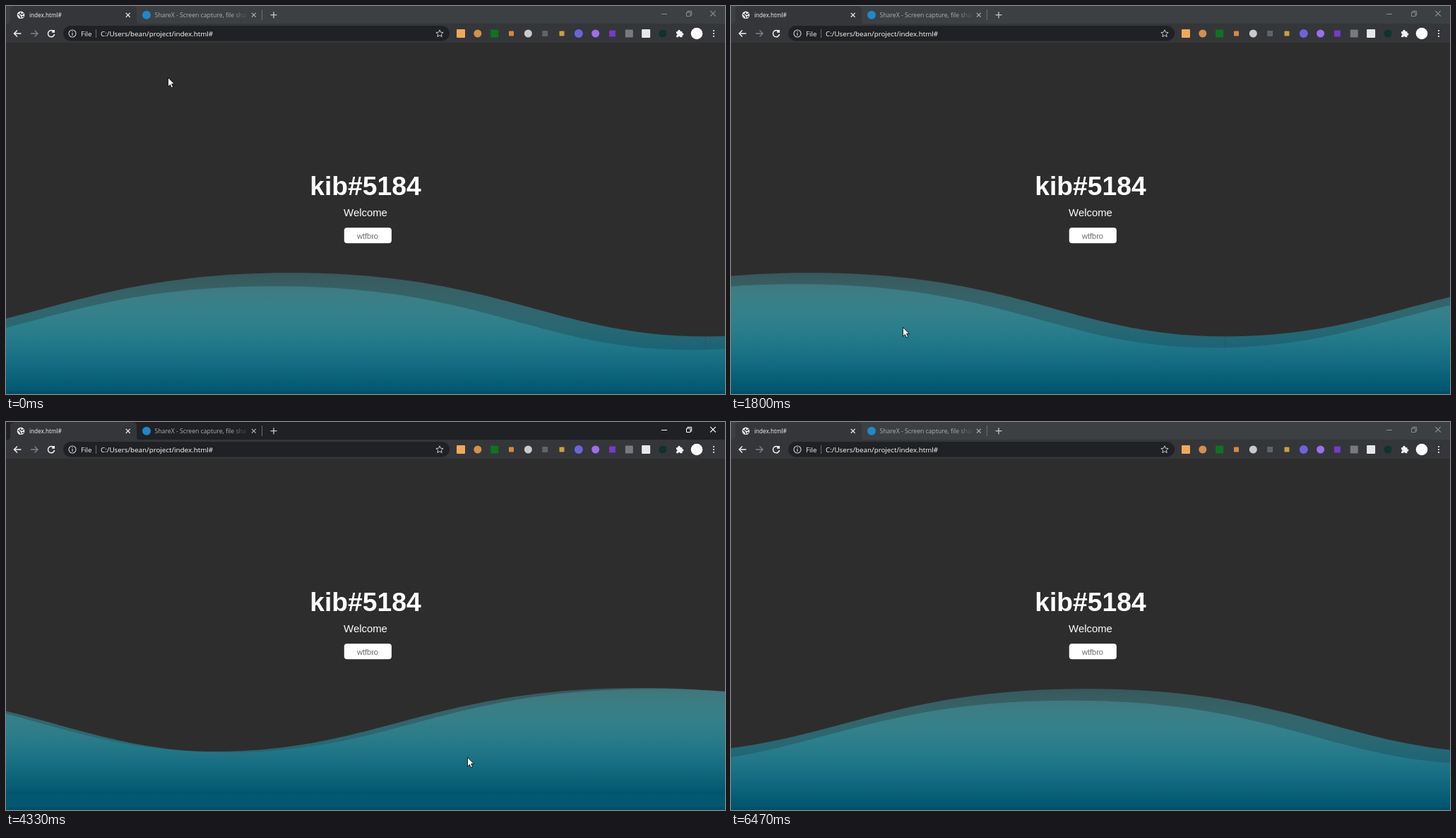
Recreate the animation shown at these times as an HTML page with a canvas. Size 1018 by 550 pixels, loop 6.54 s.

```html
<!DOCTYPE html>
<html lang="en">
<head>
<meta charset="utf-8">
<title>index.html#</title>
<style>
  html, body { margin: 0; width: 100%; height: 100%; overflow: hidden; background: #2d2d2d; }
  canvas { display: block; }
</style>
</head>
<body>
<canvas id="stage" width="1018" height="550"></canvas>
<script>
const ctx = document.getElementById('stage').getContext('2d');
const W = 1018, H = 550, TAU = Math.PI * 2;
const LOOP = 6540, FPS = 15;
const SCALE = W / 1366;          // page pixels to stage pixels
const BAR = 52;                  // height of tabs and toolbar
const OCEAN = 525.8;             // top of the solid water
const PERIOD = 7000, PHASE = 1025;
const UI = '"Open Sans", "Noto Sans", sans-serif';
const ARIAL = '"Liberation Sans", Arial, sans-serif';

// time, x, y of the pointer tip
const POINTER = [
  [0, 229, 101], [330, 238, 112], [670, 256, 175], [1000, 275, 352],
  [1330, 277, 340], [1670, 256, 420], [2000, 222, 503], [2330, 196, 522],
  [2600, 200, 479], [3000, 262, 482], [3400, 360, 449], [3870, 525, 482],
  [4330, 653, 475], [4730, 618, 528], [5200, 513, 443], [5530, 565, 485],
  [5870, 680, 555], [6540, 700, 600]
];

function bezier(x1, y1, x2, y2) {
  const at = (a, b, u) => 3 * u * (1 - u) * (1 - u) * a + 3 * u * u * (1 - u) * b + u * u * u;
  return x => {
    let lo = 0, hi = 1;
    for (let i = 0; i < 24; i++) {
      const mid = (lo + hi) / 2;
      if (at(x1, x2, mid) < x) lo = mid; else hi = mid;
    }
    return at(y1, y2, lo);
  };
}
const drift = bezier(0.36, 0.45, 0.63, 0.53);
const ease = bezier(0.25, 0.1, 0.25, 1);
const cycle = t => (t % PERIOD) / PERIOD;

function swell(t) {
  const p = cycle(t) * 2;
  return p < 1 ? -25 + 30 * ease(p) : 5 - 30 * ease(p - 1);
}

function text(str, x, y, font, color, align = 'left') {
  ctx.font = font;
  ctx.fillStyle = color;
  ctx.textAlign = align;
  ctx.fillText(str, x, y);
}

function rect(x, y, w, h, color, r = 0) {
  ctx.fillStyle = color;
  ctx.beginPath();
  ctx.roundRect(x, y, w, h, r);
  ctx.fill();
}

function disc(x, y, r, color) {
  ctx.fillStyle = color;
  ctx.beginPath();
  ctx.arc(x, y, r, 0, TAU);
  ctx.fill();
}

function line(d, color, width = 1) {
  ctx.strokeStyle = color;
  ctx.lineWidth = width;
  ctx.stroke(new Path2D(d));
}

function cross(x, y, r, color, width) {
  line(`M${x - r} ${y - r}L${x + r} ${y + r}M${x + r} ${y - r}L${x - r} ${y + r}`, color, width);
}

const CREST = new Path2D('M0 121C311 121 409.898 -.25 811 0c400 0 500 121 789 121v77H0z');
const water = ctx.createLinearGradient(0, -21.7, 0, 198);
water.addColorStop(0, 'rgba(87,187,193,.25)');
water.addColorStop(1, 'rgb(1,88,113)');

function wave(t, top) {
  ctx.save();
  ctx.translate(0, OCEAN);
  ctx.scale(SCALE, SCALE);
  ctx.translate(-1600 * drift(cycle(t)), top);
  ctx.fillStyle = water;
  for (let i = 0; i < 2; i++) {
    ctx.fill(CREST);
    ctx.translate(1600, 0);
  }
  ctx.restore();
}

function page(t) {
  rect(0, BAR, W, H - BAR, '#2d2d2d');
  text('kib#5184', 509, 268, `bold 37.26px ${ARIAL}`, '#fff', 'center');
  text('Welcome', 509, 298, `14.9px ${ARIAL}`, '#fff', 'center');
  rect(478.8, 314.2, 67.1, 22, '#fff', 4);
  text('wtfbro', 512, 329.5, `11px ${ARIAL}`, '#6b6b6b', 'center');
  rect(0, OCEAN, W, H - OCEAN, '#015871');
  const now = t + PHASE;
  wave(now, -198);
  wave(now + 125, -175 + swell(now + 1250));
  rect(0, 546, W, 4, '#015069');
}

function tabs(focused) {
  const strip = focused ? '#202124' : '#3c4043';
  const control = focused ? '#fff' : '#8b8d90';
  rect(0, 0, W, 26, strip);
  ctx.fillStyle = '#35363a';
  ctx.fill(new Path2D('M0 26Q6 26 6 20V6Q6 0 12 0H179Q185 0 185 6V20Q185 26 191 26z'));

  disc(21, 12.8, 5.3, '#f1f3f4');
  line('M17 11.5l3 2.5 1 3M21 9l-1 2 3 1 2-1.5M22.5 15.5l2.5-1', '#35363a', 1.5);
  text('index.html#', 33, 16, `8.2px ${UI}`, '#f1f3f4');
  cross(172.7, 12.8, 2.9, '#e8eaed', 1.3);

  disc(199, 12.7, 6, '#2386c8');
  const fade = ctx.createLinearGradient(318, 0, 341, 0);
  fade.addColorStop(0, '#abafb3');
  fade.addColorStop(1, 'rgba(171,175,179,.1)');
  ctx.save();
  ctx.beginPath();
  ctx.rect(205, 0, 136, 25);
  ctx.clip();
  text('ShareX - Screen capture, file sharing', 210.5, 16, `8.7px ${UI}`, fade);
  ctx.restore();
  cross(350.8, 12.8, 2.9, '#b0b3b7', 1.2);
  line('M362.5 5V20', '#6a6e72');
  line('M374.5 12.7H383.5M379 8.2V17.2', '#c4c7ca', 1.3);

  line('M928 11.5H936', control);
  line('M963.5 9H969V14.5H963.5zM965 9V7.3H970.7V13H969', control);
  cross(1001, 10.7, 3.8, control, 1.1);
}

function star(x, y, r) {
  let d = '';
  for (let i = 0; i < 10; i++) {
    const a = i * TAU / 10 - TAU / 4, q = i % 2 ? r * 0.46 : r;
    d += (i ? 'L' : 'M') + (x + q * Math.cos(a)) + ' ' + (y + q * Math.sin(a));
  }
  line(d + 'z', '#c8cacd', 1);
}

// color, half size, round?
const EXTENSIONS = [
  ['#f0a85c', 6, 0], ['#d2914a', 5.5, 1], ['#0e7420', 5.5, 0], ['#d88944', 3.5, 0],
  ['#c9cacc', 5.5, 1], ['#606469', 4, 0], ['#c9a239', 3.5, 0], ['#6d62e0', 6, 1],
  ['#9a70ee', 5.5, 1], ['#743bc8', 4.5, 0], ['#77797c', 5.5, 0], ['#e6e7e8', 6, 0],
  ['#12302f', 5.5, 1]
];

function toolbar() {
  rect(0, 25, W, BAR - 25, '#35363a');
  line('M21.5 39H11.7M16 34.5L11.5 39L16 43.5', '#f1f3f4', 1.5);
  line('M35 39H44.8M40.5 34.5L45 39L40.5 43.5', '#7f8184', 1.4);
  line('M67.6 36.2A4.6 4.6 0 1 0 68.6 40', '#f1f3f4', 1.5);
  rect(65.2, 34, 3.8, 3.8, '#f1f3f4');

  rect(81, 28, 547, 21.5, '#202124', 10.75);
  line('M99 39A5 5 0 1 1 89 39A5 5 0 1 1 99 39M94 38V42M94 35.7V37', '#d4d6d9', 1.1);
  text('File', 106, 42.5, `9.8px ${UI}`, '#f1f3f4');
  line('M127.5 33V45', '#6a6d71');
  text('C:/Users/bean/project/index.html#', 134, 42.5, `9.82px ${UI}`, '#fff');
  star(614, 39.2, 5.4);

  EXTENSIONS.forEach(([color, r, round], i) => {
    const x = 644 + i * 23.83;
    if (round) disc(x, 39, r, color);
    else rect(x - r, 39 - r, r * 2, r * 2, color, 1);
  });
  rect(949, 36, 8.5, 8.3, '#f1f3f4', 1);
  disc(953, 35.6, 1.8, '#f1f3f4');
  disc(957.6, 40, 1.8, '#f1f3f4');
  disc(949, 40.4, 1.4, '#35363a');
  disc(953.2, 44.4, 1.4, '#35363a');
  disc(978, 39, 8.3, '#fff');
  for (let i = -1; i < 2; i++) disc(1002, 39 + i * 4, 1.1, '#f1f3f4');
}

function spline(a, b, c, d, u) {
  const m1 = (c[0] - b[0]) / (c[0] - a[0] || 1), m2 = (c[0] - b[0]) / (d[0] - b[0] || 1);
  const u2 = u * u, u3 = u2 * u;
  return [1, 2].map(k =>
    (2 * u3 - 3 * u2 + 1) * b[k] + (u3 - 2 * u2 + u) * m1 * (c[k] - a[k]) +
    (3 * u2 - 2 * u3) * c[k] + (u3 - u2) * m2 * (d[k] - b[k]));
}

const ARROW = new Path2D('M.5 .5V13.2L3.4 10.5L5.3 14.8L7.5 13.8L5.6 9.6H9.3z');

function pointer(t) {
  let i = 0;
  while (i < POINTER.length - 2 && POINTER[i + 1][0] <= t + 4) i++;
  const b = POINTER[i], c = POINTER[i + 1];
  const [x, y] = spline(POINTER[i - 1] || b, b, c, POINTER[i + 2] || c, (t - b[0]) / (c[0] - b[0]));
  ctx.save();
  ctx.translate(Math.round(x), Math.round(y));
  ctx.fillStyle = '#fff';
  ctx.fill(ARROW);
  ctx.strokeStyle = '#000';
  ctx.lineWidth = 0.8;
  ctx.stroke(ARROW);
  ctx.restore();
}

const start = performance.now();

function draw(now) {
  const elapsed = Math.max(0, now - start) % LOOP;
  const t = Math.floor((elapsed + 4) * FPS / 1000) * 1000 / FPS;
  page(t);
  tabs(t > 2930 && t < 6200);
  toolbar();
  pointer(t);
  requestAnimationFrame(draw);
}
draw(start);
</script>
</body>
</html>
```
